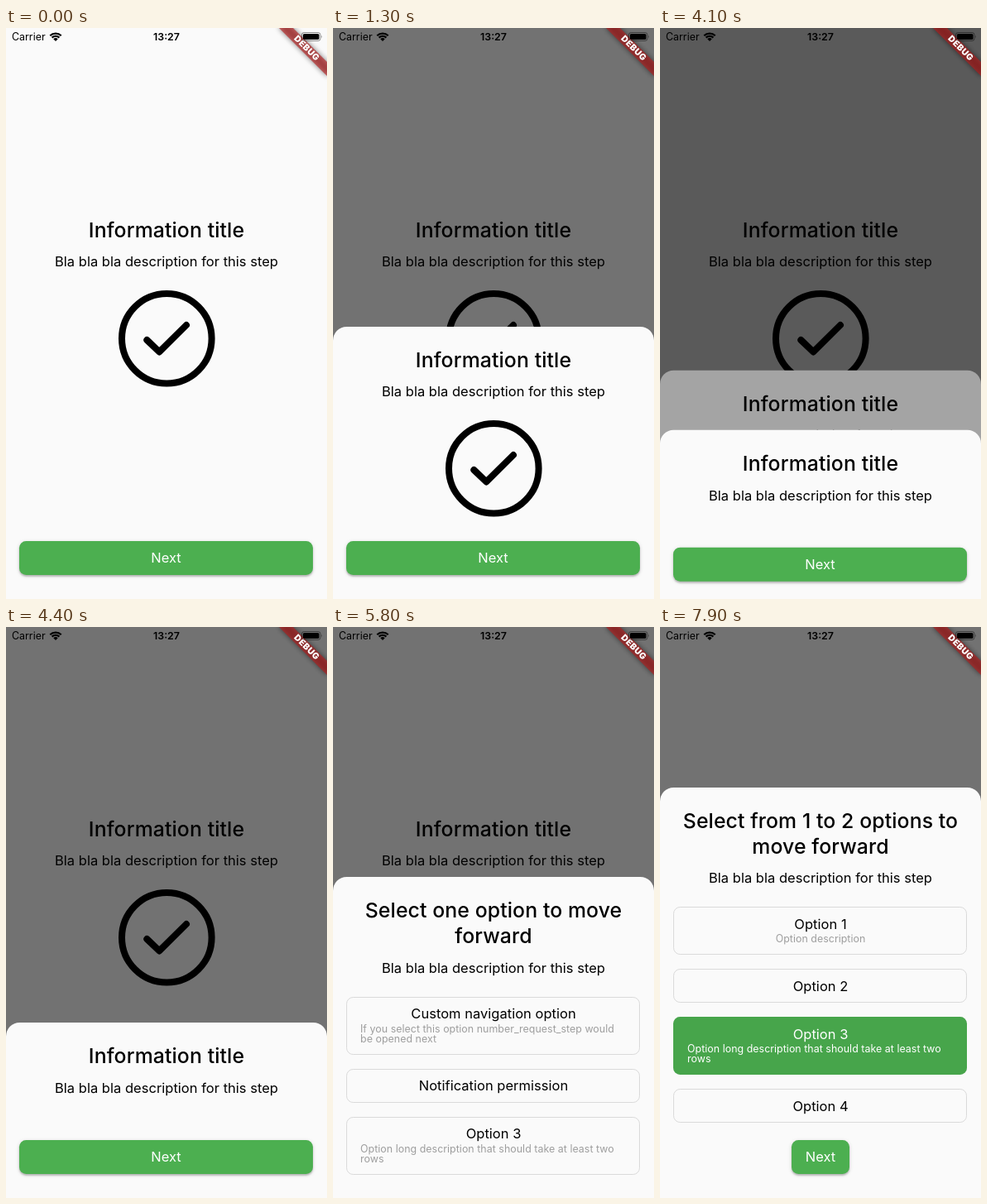
Write an HTML page that moves like this. It is 388x690 px and loops after 8000 ms.

```html
<!DOCTYPE html>
<html lang="en">
<head>
<meta charset="utf-8">
<title>Step sheets</title>
<style>
  html, body { margin: 0; width: 100%; height: 100%; overflow: hidden; background: #fafafa; }
  #stage {
    position: relative; width: 388px; height: 690px; overflow: hidden; background: #fafafa;
    font: 400 16.5px Inter, Roboto, sans-serif; font-optical-sizing: none; color: #000;
  }
  #stage div, #stage svg { position: absolute; box-sizing: border-box; }
  .text { left: 0; width: 100%; text-align: center; white-space: pre; }
  .title { font-size: 24.8px; font-weight: 500; line-height: 31px; letter-spacing: .1px; }
  .body { line-height: 20px; letter-spacing: .02px; }
  .small { font-size: 12.4px; line-height: 12.4px; letter-spacing: .04px; color: #9e9e9e; }
  .barrier { inset: 0; background: #000; opacity: 0; }
  .sheet { left: 0; width: 388px; background: #fafafa; border-radius: 16.5px 16.5px 0 0; }
  .option { left: 16px; width: 355px; border: 1px solid #dadada; border-radius: 8.3px; }
  .option .text { left: -.5px; width: 355px; }
  .option .long { left: 16px; text-align: left; }
  .fill { inset: -1px; border-radius: 8.3px; background: #47a54b; opacity: 0; }
  .button {
    --on: 1; left: 16px; width: 355px; bottom: 28.8px; height: 41.4px; border-radius: 8.3px;
    background: color-mix(in srgb, #4caf50 calc(var(--on) * 100%), #dcdcdc);
    color: color-mix(in srgb, #fff calc(var(--on) * 100%), #f0f0f0);
    box-shadow: 0 2px 2px rgba(0,0,0,calc(.2 * var(--on))), 0 1px 5px rgba(0,0,0,calc(.14 * var(--on)));
  }
  .compact { left: 159.3px; width: 69.4px; }
  .ripple { inset: 0; border-radius: 8.3px; background: #fff; opacity: 0; }
  .banner { left: 388px; top: 0; width: 0; height: 0; transform: rotate(45deg); }
  .banner div { left: -41.4px; top: 29px; width: 82.8px; height: 12.4px; }
  .banner .shade { background: rgba(0,0,0,.5); filter: blur(3px); }
  .banner .strip {
    background: rgba(183,28,28,.627); color: #fff; text-align: center;
    font-size: 10.5px; font-weight: 900; line-height: 12.4px; letter-spacing: .4px;
  }
  .status { left: 7px; right: 7px; top: 3px; font-size: 12.4px; line-height: 16px; }
  .clock { text-align: center; font-weight: 600; }
</style>
</head>
<body>
<div id="stage"></div>
<script>
const LOOP = 8000, STEP = 100, MOVE = 250, STAGE_H = 690, DIM = 0.54;
const stage = document.getElementById('stage');
const DESCRIPTION = 'Bla bla bla description for this step';
const LONG = 'Option long description that should take at least two\nrows';

function add(parent, className, style = {}, text = '') {
  const el = document.createElement('div');
  el.className = className;
  el.textContent = text;
  for (const key in style) el.style[key] = style[key] + 'px';
  parent.append(el);
  return el;
}

function addSvg(parent, left, top, width, height, content) {
  const holder = add(parent, '', { left, top, width, height });
  holder.innerHTML = `<svg width="${width}" height="${height}" style="left:0;top:0;overflow:visible" fill="none">${content}</svg>`;
  return holder;
}

const countLines = text => text.split('\n').length;

// y is the centre of the first line
const addText = (parent, kind, y, lineHeight, text) =>
  add(parent, 'text ' + kind, { top: y - lineHeight / 2 }, text);

function addHeading(parent, title, y = 40.8) {
  addText(parent, 'title', y, 31, title);
  addText(parent, 'body', y + 7 + 31 * countLines(title), 20, DESCRIPTION);
}

const addCheck = (parent, y) => addSvg(parent, 136, y - 58.3, 116.6, 116.6,
  `<circle cx="58.3" cy="58.3" r="54.3" stroke="#000" stroke-width="8"/>
   <path d="M34.3 60L49.3 74.4L82 42" stroke="#000" stroke-width="8" stroke-linecap="round" stroke-linejoin="round"/>`);

function addButton(parent, kind = '') {
  const el = add(parent, 'button ' + kind);
  return { el, label: addText(el, 'body', 20.2, 20, 'Next'), ripple: add(el, 'ripple') };
}

// Stacks [title, note] options from the top down
function addOptions(parent, options) {
  let top = 144.8;
  return options.map(([title, note]) => {
    const lines = note ? countLines(note) : 0;
    const height = 41.4 + (note ? 4.2 + 12.4 * lines : 0);
    const el = add(parent, 'option', { top, height });
    const fill = add(el, 'fill');
    const texts = [addText(el, 'body', 19.5, 20, title)];
    if (note) texts.push(addText(el, lines > 1 ? 'small long' : 'small', 38, 12.4, note));
    top += height + 16.6;
    return { fill, texts };
  });
}

const sheets = [];
function addSheet(height, open, close, snap) {
  const barrier = add(stage, 'barrier');
  const el = add(stage, 'sheet', { top: STAGE_H - height, height });
  sheets.push({ barrier, el, height, open, close, snap });
  return el;
}

// Page behind the sheets
addHeading(stage, 'Information title', 244.3);
addCheck(stage, 375.3);
const pageButton = addButton(stage);

const first = addSheet(329.5, 800, 4000, 3);
addHeading(first, 'Information title');
addCheck(first, 171.8);
const loadButton = addButton(first);

const second = addSheet(212, 4000, 5300, 6.5);
addHeading(second, 'Information title');
addButton(second);

const third = addSheet(388, 5300, 6700, 5.4);
addHeading(third, 'Select one option to move\nforward');
addOptions(third, [
  ['Custom navigation option', 'If you select this option number_request_step would\nbe opened next'],
  ['Notification permission'],
  ['Option 3', LONG],
]);

const fourth = addSheet(496.3, 6700, LOOP, 2.76);
addHeading(fourth, 'Select from 1 to 2 options to\nmove forward');
const picked = addOptions(fourth, [
  ['Option 1', 'Option description'], ['Option 2'], ['Option 3', LONG], ['Option 4'],
])[2];
const doneButton = addButton(fourth, 'compact');

// Spinner
const TICKS = 8;
const spinner = addSvg(loadButton.el, 194.5, 12.4, 16, 16,
  Array.from({ length: TICKS }, (_, i) =>
    `<path d="M8 5.4V.9" stroke="#3c3c44" stroke-width="1.6" stroke-linecap="round" transform="rotate(${i * 360 / TICKS} 8 8)"/>`).join(''));
const ticks = [...spinner.querySelectorAll('path')];

// Banner and status bar
const banner = add(stage, 'banner');
add(banner, 'shade');
add(banner, 'strip', {}, 'DEBUG');
add(stage, 'status', {}, 'Carrier');
add(stage, 'status clock', {}, '13:27');
const arc = r => `M${-.7 * r} ${-.7 * r}A${r} ${r} 0 0 1 ${.7 * r} ${-.7 * r}`;
addSvg(stage, 59.5, 15.6, 1, 1,
  `<path d="${arc(9.6)}${arc(6.3)}" stroke="#000" stroke-width="2.2"/><path d="${arc(3.9)}L0 0Z" fill="#000"/>`);
addSvg(stage, 357, 5, 26, 11,
  `<rect x=".5" y=".5" width="22.5" height="10" rx="2.8" stroke="#000" stroke-opacity=".45"/>
   <rect x="2" y="2" width="19.5" height="7" rx="1.6" fill="#000"/>
   <path d="M24.3 3.8Q26 5.5 24.3 7.2Z" fill="#000" fill-opacity=".45"/>`);

const ramp = (t, from, duration = MOVE) => Math.min(1, Math.max(0, (t - from) / duration));
const easeOut = (x, power) => 1 - (1 - x) ** power;

function render(t) {
  for (const { barrier, el, height, open, close, snap } of sheets) {
    const enter = ramp(t, open), stay = 1 - ramp(t, close) ** 2;
    const shown = easeOut(enter, snap) * stay;
    el.style.transform = `translateY(${height * (1 - shown)}px)`;
    el.style.visibility = shown > 0 ? 'visible' : 'hidden';
    barrier.style.opacity = DIM * easeOut(enter, 2) * stay;
  }
  pageButton.ripple.style.opacity = .15 * Math.sin(Math.PI * ramp(t, 700, 600));

  const loading = t >= 2100;
  loadButton.el.style.setProperty('--on', 1 - ramp(t, 2000));
  loadButton.label.style.left = loading ? '-14px' : '0';
  spinner.style.opacity = loading ? 1 : 0;
  const active = Math.floor((t - 2500) / 125) + 5;
  ticks.forEach((tick, i) => {
    const age = (i - active + 10 * TICKS) % TICKS;
    tick.style.opacity = (47 + 25 * Math.max(0, age - 3)) / 255;
  });

  const pick = ramp(t, 7400, 150);
  picked.fill.style.opacity = pick;
  for (const text of picked.texts) text.style.color = pick > 0 ? '#fff' : '';
  doneButton.el.style.setProperty('--on', ramp(t, 7400));
}

const start = performance.now();
function frame(now) {
  const t = Math.max(0, now - start) % LOOP;
  render(Math.floor(t / STEP) * STEP);
  requestAnimationFrame(frame);
}
render(0);
requestAnimationFrame(frame);
</script>
</body>
</html>
```
